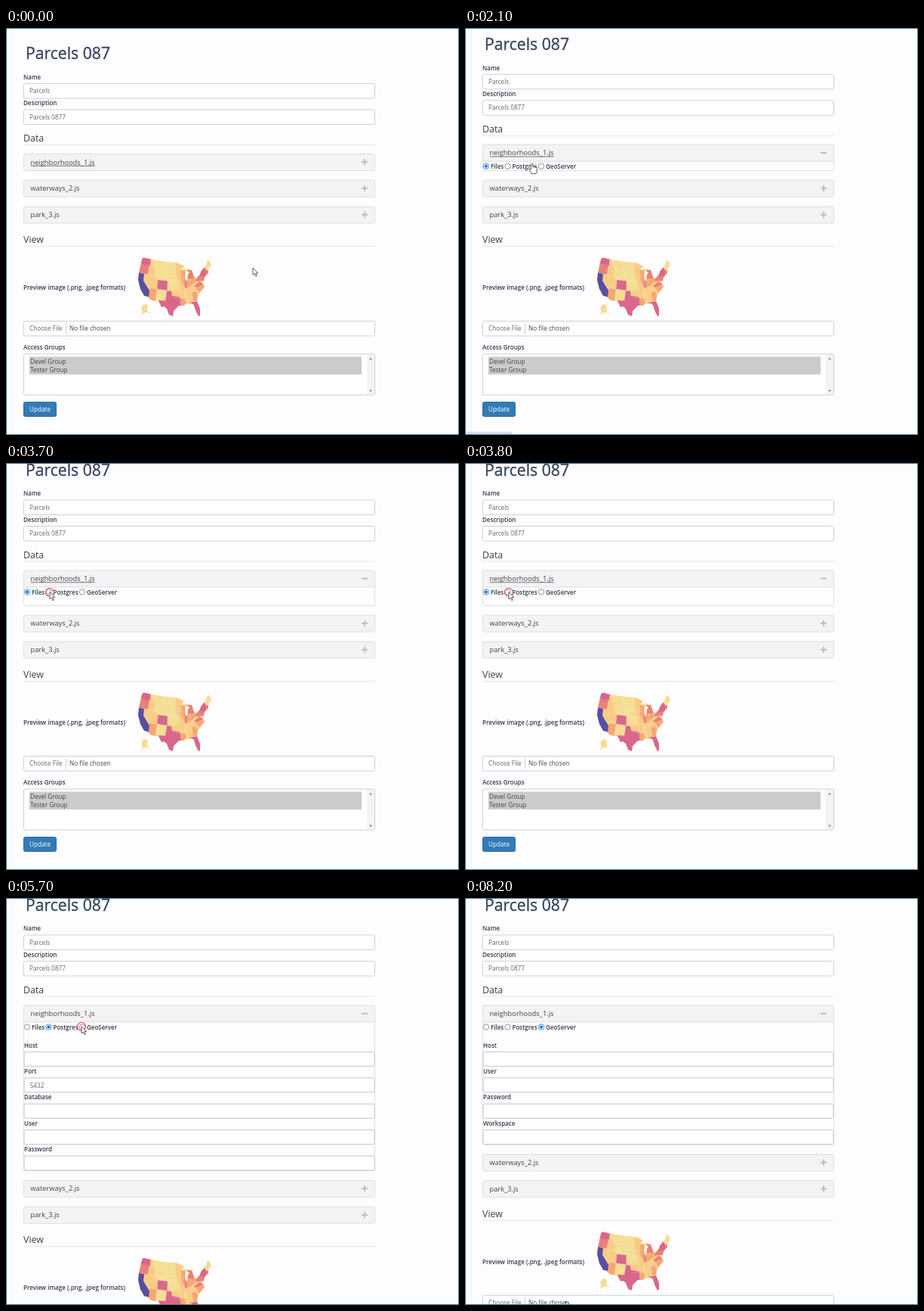
Write an HTML page that moves like this. It is 600x538 px and loops after 8.3 s.

```html
<!DOCTYPE html>
<html lang="en">
<head>
<meta charset="utf-8">
<title>Parcels form</title>
<style>
  html, body { margin: 0; width: 100%; height: 100%; overflow: hidden; background: #fdfcfe; }
  svg { display: block; width: 600px; height: 538px; font-family: "Open Sans", sans-serif; }
  text { white-space: pre; }
  .title { font-size: 21.2px; fill: #36465f; stroke: #36465f; stroke-width: .35; }
  .head { font-size: 12.4px; fill: #3d4045; }
  .label { font-size: 8px; font-weight: 600; fill: #333b4a; }
  .value { font-size: 8.2px; fill: #666; }
  .option { font-size: 8.2px; fill: #444; }
  .name { font-size: 9.3px; fill: #444; }
  .box { fill: #fff; stroke: #d0d0d4; }
  .field { fill: #fff; stroke: #c6c6ca; }
  .panel { fill: #f3f2f4; stroke: #dfdee2; }
  .rule { stroke: #e6e5e8; }
  .sign { stroke: #bcbcbf; stroke-width: 1.9; }
  .ring { fill: none; stroke: #e0474c; stroke-width: 1.1; }
  .pointer { fill: #fff; stroke: #3c3c40; stroke-width: .8; stroke-linejoin: round; }
  .radio { fill: #fff; stroke: #77777c; stroke-width: .8; }
  .on .radio { stroke: #1473d8; }
  .dot { fill: none; }
  .on .dot { fill: #1473d8; }
</style>
</head>
<body>
<svg viewBox="0 0 600 538">
  <defs>
    <clipPath id="fold"><rect id="foldBox" width="600" height="189"/></clipPath>
    <clipPath id="land">
      <path d="M180 306L182 303.5L191 305.5L208 308.5L224 310L228 311L236 315L232 319L239 318L246 320L248 326L250 331L253 330L257 326L258 322L262 317L265 313L267 307L270 308L272 314L268 319L268 324L263 329L262 334L260 337L263 342L258 348L254 354L253 361L257 371L257 380L255 381L251 373L249 366L245 363.500L241 365L238 364L236 367L229 367L222 374L221 381L216 379L213 371L209 368L206 369L202 361L192 360L188 355L183 354L178 345L175 333L176 324Z"/>
    </clipPath>
  </defs>
  <rect width="600" height="538" fill="#fdfcfe"/>
  <path d="M8.500 0V538" stroke="#efeef2"/>

  <g clip-path="url(#fold)">
    <rect id="body" class="panel" x="23.500" width="465" rx="2" style="fill:#fdfcfe"/>
    <g id="top"></g>
    <g id="pg"></g>
    <g id="geo"></g>
  </g>

  <g id="low">
    <g id="map">
      <g clip-path="url(#land)">
        <rect x="170" y="300" width="110" height="90" fill="#f5dd93"/>
        <path fill="#f9cc85" d="M192 305H194L195 314L199 320L197 328L201 332L200 345L191 345L182 334L183 325L188 326L191 314ZM224 309L238 314L231 320L233 327L237 345L236 357L221 354L219 348L213 346H230L225 326ZM237 343L252 339L258 350L248 362L241 367L238 351Z"/>
        <path fill="#f3a873" d="M191 344L200 345L198 362L186 356ZM231 320L238 321V330H249L252 329V336L243 342L238 345L232 335ZM231 357H237L241 370H229ZM246 349L252 348L256 356L254 361L248 362ZM251 343L265 339V346L257 350Z"/>
        <path fill="#ec8077" d="M178 312L190 314L188 326L174 323ZM240 320L250 320L250 331H241ZM253 329L264 327V334L251 335ZM249 341L256 335L264 339L252 343ZM263 321L269 320V326H264ZM237 331L240 330L240 343L237 344Z"/>
        <path fill="#d9678b" d="M176 300L192 303L191 314L186 315L178 312ZM201 333L214 334.500L213.500 347L200 345ZM213 347L219 348L220 354L231 356L232 369L222 384L203 371L202 360L211 360.500ZM243 363L254 361L261 383H252ZM252 329L257 321L262 316L265 320V328Z"/>
        <path fill="#5a4ea3" d="M176 323L183 325L182 334L190 347L189 356L178 355L170 335Z"/>
        <path fill="none" stroke="#fff" stroke-opacity=".4" stroke-width=".5" d="M178 312L190 314L188 326L176 323M192 305L191 314M188 326L213 333L228 336M194 305L195 314L199 320L210 320L211 309M198 319L197 331M210 318H225L224 310M213 321L212 333M211 327L225 328H233M201 332L200 345L213 347L211 360M198 361L200 345L191 343M214 336H233M214 334V347H230L229 336M231 320L232 326L235 331L233 335L238 345L236 357H221M231 347V368M239 330V343M244 331V340L238 346L254 343L264 339M237 350L251 348M241 350V366M246 349L248 362L254 361M251 348L255 355M251 330L249 339M257 335H263"/>
        <path fill="#fdfcfe" d="M238 321Q237 328 238 334H240.500Q239 327 243 322.500ZM249 320L248 325L250 331L254 328L257 323Z"/>
      </g>
      <path fill="#f5dd93" d="M180 368L182 366L184.500 365L187.500 366.500V374L192.500 378.500L187 375.500L183 376.500L178 379.500L181 375L179.500 372Z"/>
    </g>
  </g>

  <rect id="status" y="533.500" width="63" height="6" rx="2" fill="#d6dbe8"/>
  <circle id="ring" class="ring" r="5.500"/>
  <g id="cursor">
    <path id="arrow" class="pointer" d="M0 0V9.500L2.200 7.600L3.900 11.200L5.400 10.500L3.800 7H6.700Z"/>
    <path id="hand" class="pointer" d="M-1.200 8.500V1Q0 -.8 1.200 1V5Q2.400 4 3.200 5.400Q4.400 4.600 5 5.900Q6.200 5.300 6.500 6.800V10.500L5.300 14H-.5L-3.300 9.200Q-3.600 7.300 -2.300 7.600Z"/>
  </g>
  <rect x=".5" y=".5" width="599" height="537" fill="none" stroke="#3f7391"/>
</svg>

<script>
  const LOOP = 8300, STEP = 100, FOLD = 24.5;
  const $ = id => document.getElementById(id);

  const text = (cls, x, y, s, extra = '') => `<text class="${cls}" x="${x}" y="${y}" ${extra}>${s}</text>`;
  const rect = (cls, x, y, w, h, extra = '') =>
    `<rect class="${cls}" x="${x}" y="${y}" width="${w}" height="${h}" rx="2" ${extra}/>`;
  const rule = y => `<path class="rule" d="M23 ${y}H489"/>`;
  const input = (y, value = '') => rect('box', 23.5, y, 465, 19.5) + text('value', 31, y + 12.7, value);
  const panel = (y, name, id = '') =>
    rect('panel', 23.5, y, 465, 22) + text('name', 32.5, y + 14, name) +
    `<path class="sign" d="M471 ${y + 10.7}h8"/><path class="sign" id="${id}" d="M475 ${y + 6.7}v8"/>`;
  const radio = (id, x, name) =>
    `<g id="${id}"><circle class="radio" cx="${x}" cy="195" r="3.700"/>` +
    `<circle class="dot" cx="${x}" cy="195" r="2.100"/></g>` + text('label', x + 6, 198.3, name);
  const fields = names => names.map((name, i) => {
    const y = 203.4 + i * 34.4;
    return text('label', 24, y - 5.8, name) + rect('field', 24, y, 464, 19) +
      text('value', 31.7, y + 12.7, name === 'Port' ? '5432' : '');
  }).join('');

  $('top').innerHTML =
    text('title', 26, 41, 'Parcels 087') +
    text('label', 23, 67.8, 'Name') + input(73.5, 'Parcels') +
    text('label', 23, 102.2, 'Description') + input(108, 'Parcels 0877') +
    text('head', 23, 150.4, 'Data') + rule(154.5) +
    panel(166.5, 'neighborhoods_1.js', 'plus') +
    '<path id="line" d="M32.500 182.300H118" stroke="#555" stroke-width=".8"/>' +
    radio('files', 28, 'Files') + radio('postgres', 56.5, 'Postgres') + radio('geoserver', 101, 'GeoServer');

  $('pg').innerHTML = fields(['Host', 'Port', 'Database', 'User', 'Password']);
  $('geo').innerHTML = fields(['Host', 'User', 'Password', 'Workspace']);

  $('low').insertAdjacentHTML('afterbegin',
    panel(201.2, 'waterways_2.js') + panel(236, 'park_3.js') +
    text('head', 23, 284, 'View') + rule(288.5) +
    text('label', 23, 346.2, 'Preview image (.png, .jpeg formats)') +
    rect('box', 23.5, 387.5, 465, 19.5) + '<path d="M79.500 390V405" stroke="#d0d0d4"/>' +
    text('value', 31, 400.4, 'Choose File') + text('option', 84, 400.4, 'No file chosen') +
    text('label', 23, 425, 'Access Groups') + rect('box', 23.5, 431, 465, 54) +
    '<path d="M31 434.500H471V458H31Z" fill="#cbcacc"/><path d="M478 432H488V484H478Z" fill="#f4f3f5"/>' +
    '<path d="M480.800 438.500L483 435.500L485.200 438.500ZM480.800 478.500L483 481.500L485.200 478.500Z" fill="#99999c"/>' +
    text('option', 32, 443.6, 'Devel Group') + text('option', 32, 455.4, 'Tester Group') +
    rect('', 23.5, 494.5, 43, 19, 'fill="#337ab7" stroke="#2e6da4"') +
    text('option', 31, 507.2, 'Update', 'style="fill:#fff"'));

  // time, x, y
  const path = [
    [0, 327, 317], [600, 327, 317], [1200, 108.5, 207.5], [1500, 97, 179], [1700, 88.7, 178.7],
    [2700, 88.7, 178.7], [3300, 58, 170.5], [4600, 58, 170.5], [5000, 95.5, 169.5],
    [5500, 100, 169.5], [6800, 100, 169.5], [7200, 140, 548], [7900, 140, 548], [8200, 133.5, 533]
  ];
  const clicks = [1900, 3700, 5600];

  const ease = (t, a, b) => {
    const p = Math.min(1, Math.max(0, (t - a) / (b - a)));
    return p * p * (3 - 2 * p);
  };
  const show = (id, on) => $(id).setAttribute('display', on ? 'inline' : 'none');
  const move = (id, x, y) => $(id).setAttribute('transform', `translate(${x} ${y})`);

  function pointerAt(t) {
    const i = path.findIndex(k => k[0] > t);
    if (i < 0) return path[path.length - 1].slice(1);
    const [a, x, y] = path[i - 1], [b, u, v] = path[i];
    const p = ease(t, a, b);
    return [x + (u - x) * p, y + (v - y) * p];
  }

  function draw(t) {
    const fold = FOLD * ease(t, 1900, 2300);
    const mode = t < 3900 ? 'files' : t < 5800 ? 'postgres' : 'geoserver';
    const drop = { files: 0, postgres: 172.2, geoserver: 137.7 }[mode];

    move('top', 0, -fold);
    move('low', 0, drop);
    $('foldBox').setAttribute('height', 189 + drop);
    $('body').setAttribute('y', 180 - fold);
    $('body').setAttribute('height', 8.5 + fold + drop);
    show('body', fold > 0);
    show('plus', t < 2000);
    show('line', t < 3900);
    show('pg', mode === 'postgres');
    show('geo', mode === 'geoserver');
    for (const id of ['files', 'postgres', 'geoserver']) $(id).classList.toggle('on', id === mode);

    const [x, y] = pointerAt(t);
    const hand = t >= 1100 && t < 2900;
    move('cursor', x, y);
    move('ring', x, y + .5);
    show('hand', hand);
    show('arrow', !hand);
    show('ring', clicks.some(c => t >= c && t < c + 200));
    show('status', t >= 1600 && t < 2800);
  }

  function tick() {
    draw(Math.floor(performance.now() % LOOP / STEP) * STEP);
    requestAnimationFrame(tick);
  }
  tick();
</script>
</body>
</html>
```
